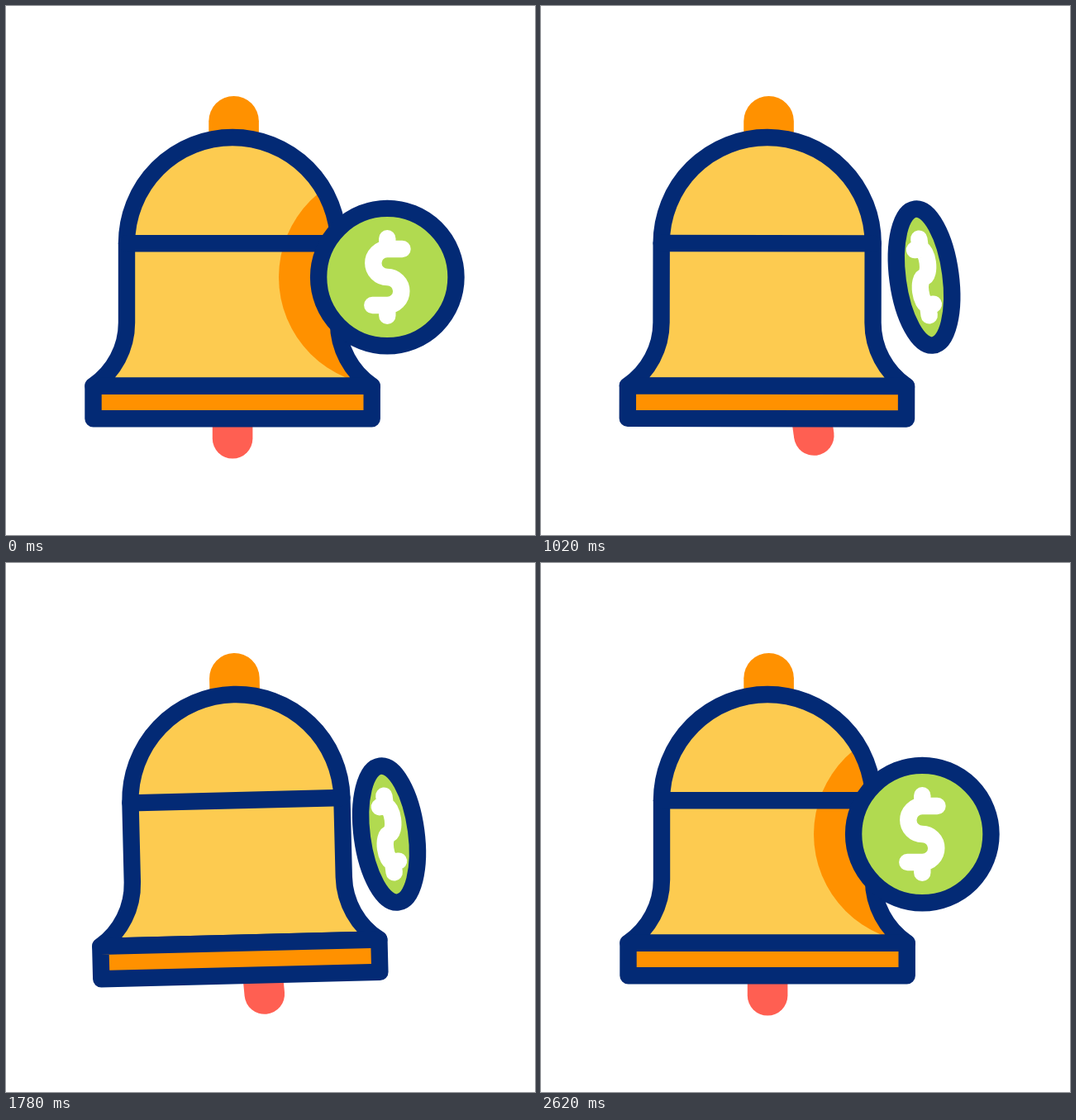
An HTML page with a canvas that plays this animation: 640 by 640 pixels, repeating every 2.82 s.

```html
<!DOCTYPE html>
<html lang="en">
<head>
<meta charset="utf-8">
<title>Ringing bell with coin</title>
<style>
  html, body { margin: 0; width: 100%; height: 100%; overflow: hidden; background: #fff; }
  canvas { display: block; }
</style>
</head>
<body>
<canvas id="stage" width="640" height="640"></canvas>
<script>
const ctx = document.getElementById('stage').getContext('2d');

const LOOP = 2820;
const NAVY = '#032a75', YELLOW = '#fdcb50', ORANGE = '#ff9100';
const GREEN = '#b1da50', RED = '#ff5f52', WHITE = '#fff';
const PIVOT = { x: 275.5, y: 109 };
const COIN_AXIS = { x: 462.9, y: 328.1 };

const body = new Path2D('M105.5 459.7A92.9 92.9 0 0 0 146 383V287A128 128 0 0 1 402 287V383A92.9 92.9 0 0 0 442.7 459.7Z');
const band = new Path2D('M146 287.2H402');
const base = new Path2D('M105.5 459.7H442.7V499.2H105.5Z');
const knob = new Path2D('M245.3 175V139.3A30.3 30.3 0 0 1 305.9 139.3V175Z');
const clapper = new Path2D('M249.8 488V523.2A24.3 24.3 0 0 0 298.4 523.2V488Z');
const dollar = new Path2D('M479.5 294H461.3A17 17 0 0 0 461.3 328A17 17 0 0 1 461.3 362H443.3M461.3 281.3V294M461.3 362V374.8');
const coin = disc(83.2);
const shade = disc(131.3);

function disc(radius) {
  const path = new Path2D();
  path.arc(461.3, 328.1, radius, 0, Math.PI * 2);
  path.closePath();
  return path;
}

// Values at equal time steps, eased in and out between neighbours.
function keyed(values, step, time) {
  const pos = Math.min(Math.max(time / step, 0), values.length - 1);
  const i = Math.min(Math.floor(pos), values.length - 2);
  const u = pos - i;
  return values[i] + (values[i + 1] - values[i]) * u * u * (3 - 2 * u);
}

const swing = time => keyed([0, 10, -8, 6, -4, 2, 0], 400, time);

function turnAbout(point, degrees, scaleX = 1) {
  return new DOMMatrix()
    .translate(point.x, point.y)
    .rotate(degrees)
    .scale(scaleX, 1)
    .translate(-point.x, -point.y);
}

function moved(path, matrix) {
  const result = new Path2D();
  result.addPath(path, matrix);
  return result;
}

function fill(path, color) {
  ctx.fillStyle = color;
  ctx.fill(path);
}

function stroke(path, color) {
  ctx.strokeStyle = color;
  ctx.stroke(path);
}

function draw(time) {
  const bellTurn = turnAbout(PIVOT, swing(time));
  const clapperTurn = turnAbout(PIVOT, swing(time) + swing(time - 200));
  const flip = keyed([1, -1, 1, -1, 1], 600, time - 200);
  const tilt = keyed([0, -10, 0], 1200, time - 200);
  const coinTurn = turnAbout(COIN_AXIS, tilt, flip);

  ctx.fillStyle = WHITE;
  ctx.fillRect(0, 0, 640, 640);
  ctx.lineWidth = 20.4;
  ctx.lineCap = ctx.lineJoin = 'round';

  fill(moved(clapper, clapperTurn), RED);
  fill(moved(knob, bellTurn), ORANGE);

  const bell = moved(body, bellTurn);
  fill(bell, YELLOW);
  ctx.save();
  ctx.clip(bell);
  fill(moved(shade, coinTurn), ORANGE);
  ctx.restore();
  stroke(bell, NAVY);
  stroke(moved(band, bellTurn), NAVY);

  const foot = moved(base, bellTurn);
  fill(foot, ORANGE);
  stroke(foot, NAVY);

  // Paths are flipped before stroking, so the outlines keep their width.
  const face = moved(coin, coinTurn);
  fill(face, GREEN);
  stroke(face, NAVY);
  stroke(moved(dollar, coinTurn), WHITE);
}

const start = performance.now();
function tick() {
  draw((performance.now() - start) % LOOP);
  requestAnimationFrame(tick);
}
tick();
</script>
</body>
</html>
```
